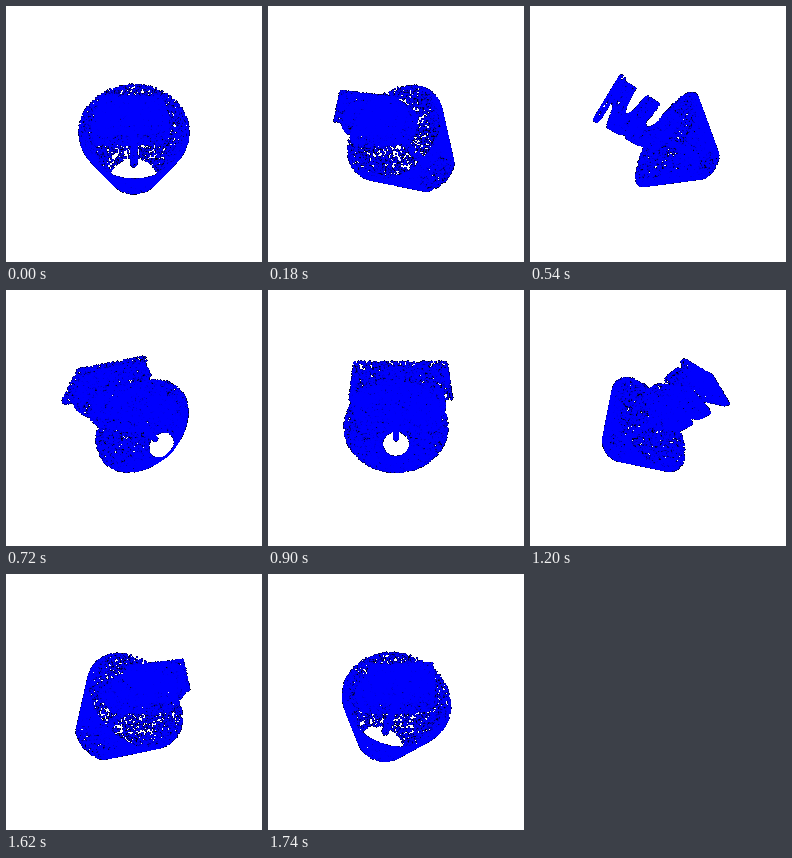
Recreate the animation shown at these times as a matplotlib script. Size 256x256 px, loop 1.8 s.

```python
import numpy as np
import matplotlib.pyplot as plt
from matplotlib.animation import FuncAnimation

SIZE, FRAMES, LOOP = 256, 30, 1800
FOCAL = SIZE / 2 / np.tan(np.radians(30))  # camera distance, in pixels at the pivot
DOT = 1.28
TILT = np.radians(30)
rng = np.random.default_rng(4)


# All parts are point sets with columns: along the axis, across, thickness
def cone_wall(n, u0, r0, u1, r1):
    r = np.sqrt(rng.uniform(min(r0, r1) ** 2, max(r0, r1) ** 2, n))
    a = rng.uniform(0, 2 * np.pi, n)
    return np.column_stack([u0 + (r - r0) / (r1 - r0) * (u1 - u0), r * np.cos(a), r * np.sin(a)])


def box_wall(density, u0, u1, w0, w1, v):
    low, high = np.array([u0, w0, -v]), np.array([u1, w1, v])
    span = high - low
    faces = []
    for axis in range(3):
        area = np.prod(np.delete(span, axis))
        for side in (low, high):
            p = low + rng.random((int(area * density), 3)) * span
            p[:, axis] = side[axis]
            faces.append(p)
    return np.vstack(faces)


def coil(n, u0, pitch, turns, half, wc, wr, vr):
    """Flattened solid coil with a rounded-rectangle outline."""
    a = rng.uniform(0, 2 * np.pi * turns, n)
    outer = rng.random(n) < 0.4
    rho = np.where(outer, 1, np.sqrt(rng.random(n)))
    off = half * np.where(outer, rng.uniform(-1, 1, n), rng.choice([-1, 1], n))
    c, s = -np.cos(a), np.sin(a)
    rho = rho / (c ** 6 + s ** 6) ** (1 / 6)
    return np.column_stack([u0 + pitch * a / (2 * np.pi) + off, wc + wr * rho * c, vr * rho * s])


cloud = np.vstack([
    cone_wall(7400, 7, 53, 64.5, 17),
    cone_wall(260, 0, 2.5, 50, 2.3),
    box_wall(0.27, -60, -56, -41, 34, 18),
    coil(4600, -54, 23.5, 2.2, 6, -2.5, 38.5, 18),
])
u, w, v = cloud.T
depth = u * np.cos(TILT) + v * np.sin(TILT)
height = -u * np.sin(TILT) + v * np.cos(TILT)


def render(k):
    a = 2 * np.pi * k / FRAMES
    x = depth * np.sin(a) + w * np.cos(a)
    z = depth * np.cos(a) - w * np.sin(a)
    s = FOCAL / (FOCAL - z)
    px, py = SIZE / 2 + x * s, SIZE / 2 - height * s

    # Soft dots blend over black; untouched pixels stay white
    clear = np.ones((SIZE, SIZE))
    hit = np.zeros((SIZE, SIZE), bool)
    for dy in (-1, 0, 1):
        for dx in (-1, 0, 1):
            ix, iy = np.floor(px).astype(int) + dx, np.floor(py).astype(int) + dy
            d2 = ((ix + 0.5 - px) ** 2 + (iy + 0.5 - py) ** 2) / DOT ** 2
            m = d2 < 1
            np.multiply.at(clear, (iy[m], ix[m]), d2[m])
            hit[iy[m], ix[m]] = True
    img = np.ones((SIZE, SIZE, 3))
    img[hit] = 0
    img[..., 2][hit] = 1 - clear[hit]
    return img


fig = plt.figure(figsize=(SIZE / 100, SIZE / 100), dpi=100, facecolor="white")
ax = fig.add_axes([0, 0, 1, 1])
ax.axis("off")
view = ax.imshow(render(0), interpolation="nearest", aspect="auto")


def update(k):
    view.set_data(render(k))
    return (view,)


anim = FuncAnimation(fig, update, frames=FRAMES, interval=LOOP / FRAMES, repeat=True, repeat_delay=0)
plt.show()
```
